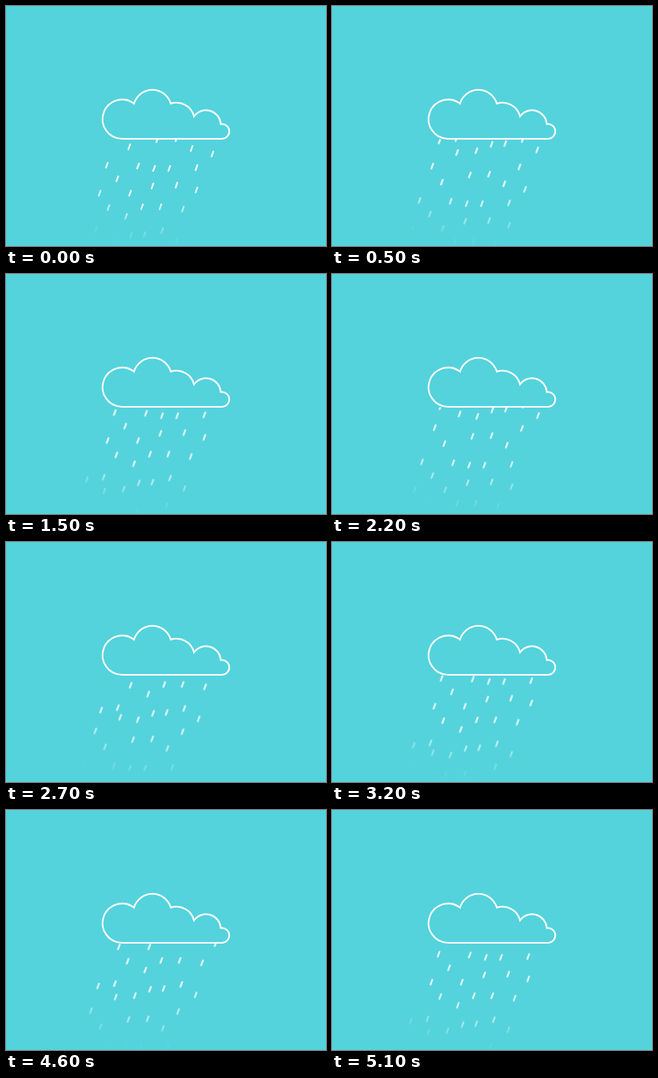
An HTML page without scripts for the animation above (5200 ms loop, 400 by 300 pixels).

```html
<!DOCTYPE html>
<html lang="en">
<head>
<meta charset="utf-8">
<title>Rain cloud</title>
<style>
  html, body { margin: 0; width: 100%; height: 100%; overflow: hidden; background: #54d3dc; }
  svg { display: block; width: 400px; height: 300px; fill: none; stroke: #fff; stroke-width: 2; }
  .rain { animation: fall 5.2s steps(52) infinite; }
  @keyframes fall { to { transform: translate(-174.5px, 459.2px); } }
</style>
</head>
<body>
<svg viewBox="0 0 400 300">
  <defs>
    <radialGradient id="fade" gradientUnits="userSpaceOnUse" cx="0" cy="0" r="136"
      gradientTransform="translate(180 167) scale(1.15 1)">
      <stop offset=".52" stop-color="#fff"/>
      <stop offset=".74" stop-color="#fff" stop-opacity=".54"/>
      <stop offset=".89" stop-color="#fff" stop-opacity=".18"/>
      <stop offset="1" stop-color="#fff" stop-opacity="0"/>
    </radialGradient>
    <!-- Hides rain above the cloud base and fades it out below -->
    <mask id="below" maskUnits="userSpaceOnUse" x="0" y="0" width="400" height="300">
      <rect y="166.5" width="400" height="134" fill="url(#fade)" stroke="none"/>
    </mask>
    <path id="shower" transform="translate(1.4 -3.8)" d="
      M183 113l-2.8 7.6 M152 130l-2.8 7.6 M261 131l-2.8 7.6 M223 140l-2.8 7.6
      M199 141l-2.8 7.6 M164 150l-2.8 7.6 M242 152l-2.8 7.6
      M136 173l-2.8 7.6 M175 174l-2.8 7.6 M195 177l-2.8 7.6 M214 177l-2.8 7.6
      M248 176l-2.8 7.6 M149 190l-2.8 7.6 M193 199l-2.8 7.6 M223 198l-2.8 7.6
      M248 204l-2.8 7.6 M127 208l-2.8 7.6 M165 208l-2.8 7.6 M138 226l-2.8 7.6
      M180 225l-2.8 7.6 M203 225l-2.8 7.6 M231 228l-2.8 7.6 M160 237l-2.8 7.6
      M101 257l-2.8 7.6 M122 254l-2.8 7.6 M205 255l-2.8 7.6 M166 261l-2.8 7.6
      M183 260l-2.8 7.6 M147 269l-2.8 7.6 M223 268l-2.8 7.6"/>
  </defs>

  <g mask="url(#below)">
    <g class="rain">
      <use href="#shower" x="-9.9" y="26"/>
      <path d="M259.5 181.2l-2.8 7.6"/>
      <use href="#shower" x="50.3" y="-132.3"/>
      <use href="#shower" x="108.4" y="-285.3"/>
      <use href="#shower" x="168.4" y="-443.2"/>
    </g>
  </g>

  <path d="M145 166A24.5 24.5 0 1 1 160 122A24 24 0 0 1 206 122A22.7 22.7 0 0 1 235 138
    A18.5 18.5 0 0 1 268.5 147.5A9.3 9.3 0 1 1 270 166Z"/>
</svg>
</body>
</html>
```
